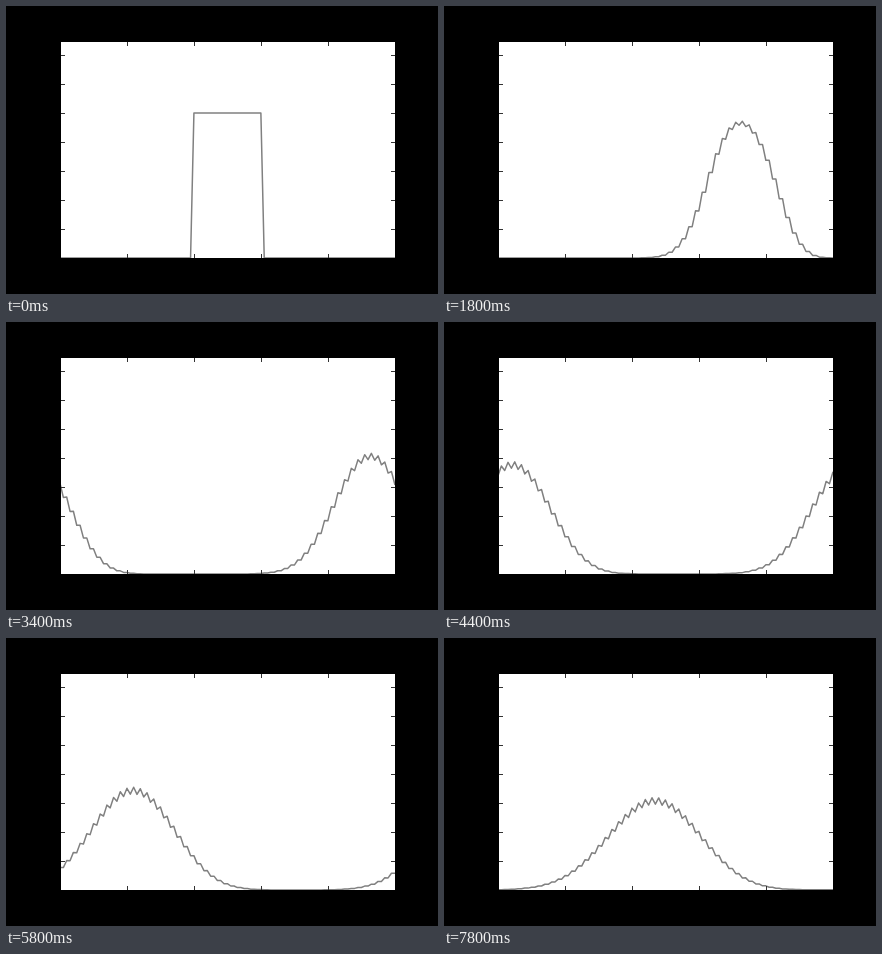
Animation of 432 by 288 pixels, one loop 8000 ms. Source, as an HTML page:

```html
<!DOCTYPE html>
<html lang="en">
<head>
<meta charset="utf-8">
<title>Advected pulse</title>
<style>
html, body { margin: 0; width: 100%; height: 100%; overflow: hidden; background: #000; }
svg { display: block; width: 432px; height: 288px; }
</style>
</head>
<body>
<svg viewBox="0 0 432 288">
  <clipPath id="area"><rect x="55" y="36" width="334" height="216"/></clipPath>
  <rect x="55" y="36" width="334" height="216" fill="#fff"/>
  <g clip-path="url(#area)">
    <polyline id="curve" fill="none" stroke="#808080" stroke-width="1.5" stroke-linejoin="round" stroke-linecap="square"/>
  </g>
  <path id="ticks" fill="#333" shape-rendering="crispEdges"/>
</svg>
<script>
const CELLS = 101, FRAMES = 40, FRAME_MS = 200, STEPS_PER_FRAME = 5, COURANT = 0.5;
const toX = i => 54 + 3.348 * i;
const toY = u => 252 - 144.96 * u;

// One Lax-Friedrichs step with periodic ends.
const advance = u => u.map((_, i) => {
  const left = u[(i + CELLS - 1) % CELLS], right = u[(i + 1) % CELLS];
  return ((1 + COURANT) * left + (1 - COURANT) * right) / 2;
});

const toPoints = u => u.map((v, i) => toX(i).toFixed(2) + ',' + toY(v).toFixed(2)).join(' ');

let wave = Array.from({ length: CELLS }, (_, i) => i >= 40 && i <= 60 ? 1 : 0);
const poses = [];
for (let f = 0; f < FRAMES; f++) {
  poses.push(toPoints(wave));
  for (let s = 0; s < STEPS_PER_FRAME; s++) wave = advance(wave);
}

let ticks = '';
for (let k = 1; k < 5; k++) {
  const x = Math.round(toX(20 * k));
  for (const y of [36, 248]) ticks += `M${x} ${y}h1v4h-1z`;
}
for (let k = 1; k < 8; k++) {
  const y = Math.round(toY(0.2 * k));
  for (const x of [55, 385]) ticks += `M${x} ${y}h4v1h-4z`;
}
document.getElementById('ticks').setAttribute('d', ticks);

const curve = document.getElementById('curve');
let shown = -1;
function draw() {
  const frame = Math.floor(performance.now() / FRAME_MS) % FRAMES;
  if (frame !== shown) curve.setAttribute('points', poses[shown = frame]);
  requestAnimationFrame(draw);
}
draw();
</script>
</body>
</html>
```
